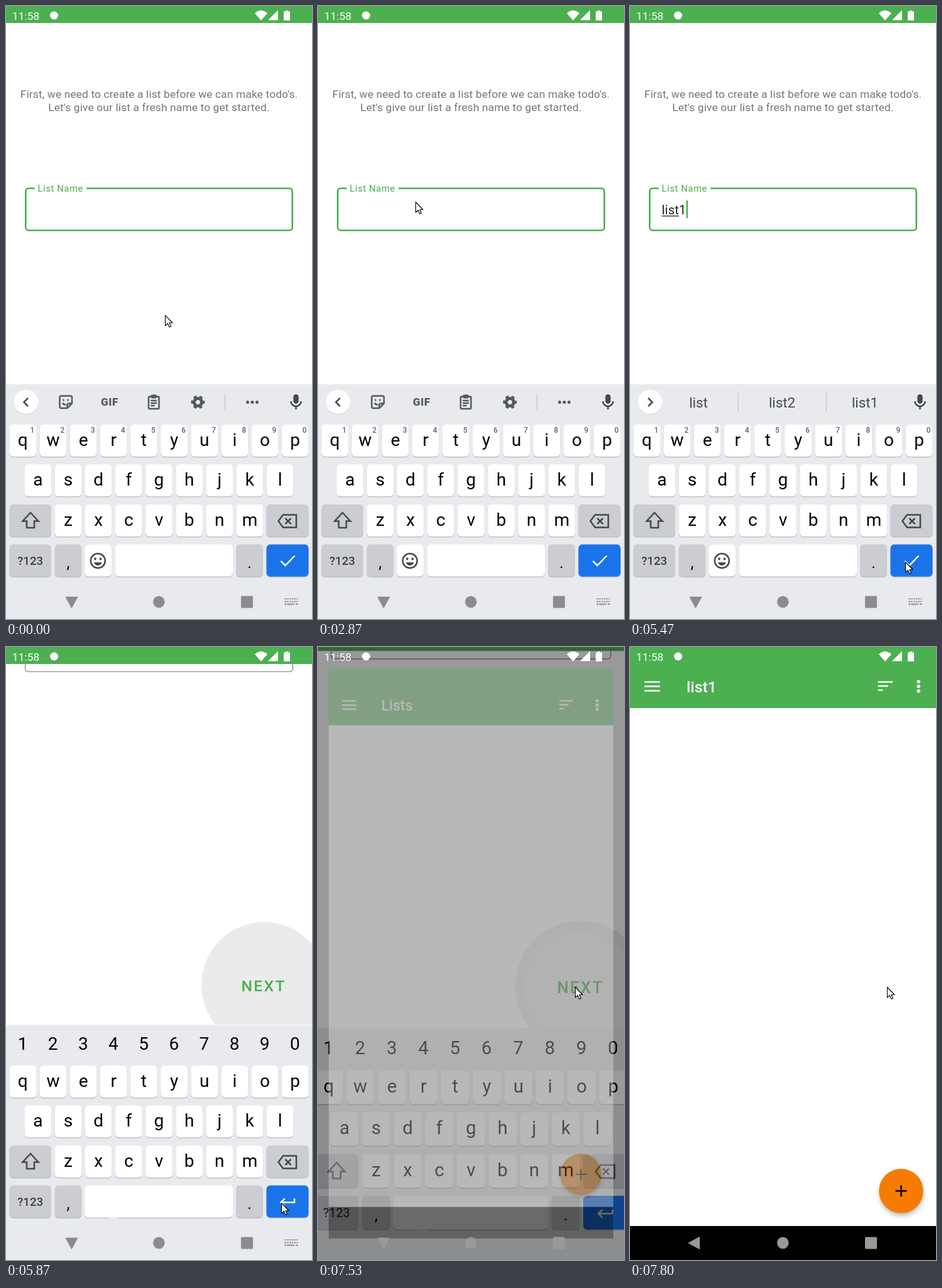
Write an HTML page that moves like this. It is 487x974 px and loops after 8000 ms.

```html
<!DOCTYPE html>
<html lang="en">
<head>
<meta charset="utf-8">
<title>New list</title>
<style>
  html, body { margin: 0; width: 100%; height: 100%; overflow: hidden; background: #000; }
  svg { display: block; width: 487px; height: 974px; font-family: Roboto, sans-serif; }
  .mid { text-anchor: middle; }
  .line { fill: none; stroke: #45484c; stroke-width: 2.5; }
  .white { stroke: #fff; }
  .medium { font-weight: 500; }
</style>
</head>
<body>
<svg viewBox="0 0 487 974" xmlns="http://www.w3.org/2000/svg">
  <defs>
    <clipPath id="view"><rect y="27" width="487" height="574"/></clipPath>
    <filter id="soft" x="-30%" y="-30%" width="160%" height="160%"><feGaussianBlur stdDeviation="4"/></filter>
  </defs>

  <g id="setup">
    <rect width="487" height="974" fill="#fff"/>
    <g clip-path="url(#view)">
      <g id="page">
        <g class="mid" font-size="17.36" letter-spacing=".13" fill="#757575">
          <text x="243.5" y="146">First, we need to create a list before we can make todo's.</text>
          <text x="243.5" y="167">Let's give our list a fresh name to get started.</text>
        </g>
        <rect id="outline" fill="none"/>
        <rect x="45.5" y="285" width="82.5" height="12" fill="#fff"/>
        <text id="label" x="50.5" y="295" font-size="14.9" letter-spacing=".55">List Name</text>
        <text id="input" x="50.5" y="331" font-size="19.84" letter-spacing=".3" fill="#212121"></text>
        <rect id="under" x="50.5" y="333" height="1.3" fill="#212121"/>
        <rect id="caret" y="309" width="2.5" height="28" fill="#4caf50"/>
        <circle id="focus" cx="411" cy="855" fill="#ebebeb"/>
        <circle id="press" cx="411" cy="857" fill="#fff" opacity=".18"/>
        <text class="medium" x="374.5" y="865" font-size="24.8" letter-spacing="2.2" fill="#4caf50">NEXT</text>
      </g>
    </g>
    <rect width="487" height="27" fill="#4caf50"/>

    <rect y="600" width="487" height="374" fill="#f4f5f6"/>
    <rect y="601.5" width="487" height="373" fill="#e8eaed"/>
    <g id="bar">
      <circle cx="32" cy="630" r="19.3" fill="#d2d4d7"/>
      <circle cx="32" cy="629" r="19.3" fill="#fff"/>
      <path id="chevron" class="line"/>
      <g fill="#45484c">
        <rect x="457.3" y="617" width="8.4" height="15" rx="4.2"/>
        <path class="line" d="M453.5 628a8 8 0 0 0 16 0M461.5 636v5"/>
      </g>
    </g>
    <g id="tools" fill="#55585c">
      <g class="line" stroke-width="2.3" style="stroke:#55585c">
        <path d="M88 619.5h14.500q2.500 0 2.500 2.500v9.500l-7.500 7.500h-9.500q-2.500 0-2.500-2.500v-14.500q0-2.500 2.500-2.500zM97.500 639v-5q0-2.500 2.500-2.500h5M90 630.500q1.500 3.500 5.500 3"/>
        <path d="M229 620.500h12.500q2 0 2 2v15.500q0 2-2 2h-12.500q-2 0-2-2v-15.500q0-2 2-2zM230.500 627h9.500M230.500 631h9.500M230.500 635h6"/>
      </g>
      <circle cx="91.500" cy="626" r="1.500"/><circle cx="98.500" cy="626" r="1.500"/>
      <rect x="230.500" y="617.500" width="9.500" height="6" rx="2"/>
      <text class="mid" x="165" y="635" font-size="17" font-weight="900" letter-spacing=".6">GIF</text>
      <circle cx="305.500" cy="629.500" r="6" fill="none" stroke="#55585c" stroke-width="5"/>
      <circle cx="305.500" cy="629.500" r="9.300" fill="none" stroke="#55585c" stroke-width="3.200" stroke-dasharray="5 4.740" stroke-dashoffset="2.500"/>
      <circle cx="384.500" cy="629.500" r="2.500"/><circle cx="392" cy="629.500" r="2.500"/><circle cx="399.500" cy="629.500" r="2.500"/>
      <path d="M348.500 616v27" stroke="#c4c7ca" stroke-width="1.300"/>
    </g>
    <g id="suggest" class="mid" font-size="22.3" fill="#45484c">
      <path d="M172 614v30M312.500 614v30" stroke="#c4c7ca" stroke-width="1.300"/>
      <text x="109" y="638"></text><text x="242" y="638"></text><text x="374" y="638"></text>
    </g>
    <g id="digits" class="mid" font-size="28"></g>
    <g id="keys" class="mid" font-size="28"></g>
    <g id="hints" class="mid medium" font-size="12" fill="#5f6368"></g>

    <path class="line" d="M39 805l12.500 13.500h-6.500v10.500h-12v-10.500h-6.500z"/>
    <path class="line" d="M441 808.500h21v20h-21l-7.500-10zM444.500 814l9 9M453.500 814l-9 9"/>
    <g id="smile">
      <circle class="line" cx="146.300" cy="881.500" r="11.500"/>
      <g fill="#45484c">
        <circle cx="142" cy="878.500" r="1.900"/><circle cx="150.600" cy="878.500" r="1.900"/>
        <path d="M139.800 884h13q-2 5-6.500 5t-6.500-5z"/>
      </g>
    </g>
    <path id="check" class="line white" d="M437.500 882l7 7 15-15.500"/>
    <path id="enter" class="line white" d="M459 876v6.500h-21M443.500 876.500l-6 6 6 6"/>
    <g id="mini" fill="none" stroke="#8c8c8f" stroke-width="2.200" stroke-dasharray="2.200 1.600">
      <path d="M443.500 942h21M443.500 946.300h21"/>
      <path d="M443.500 950.500h3.800M448 950.500h11M461 950.500h3.500" stroke-dasharray="none"/>
    </g>
  </g>

  <rect id="dim" width="487" height="974"/>

  <g id="lists">
    <rect width="487" height="974" fill="#fff"/>
    <rect width="487" height="97" fill="#4caf50"/>
    <rect y="920" width="487" height="54"/>
    <path class="line white" d="M23 55.500h24.500M23 62.500h24.500M23 69.500h24.500M394.500 55.500h23.500M394.500 62h16M394.500 68.500h8"/>
    <g fill="#fff">
      <circle cx="459.300" cy="55" r="2.800"/><circle cx="459.300" cy="62.500" r="2.800"/><circle cx="459.300" cy="70" r="2.800"/>
      <text id="title" class="medium" x="90" y="72" font-size="24.8"></text>
    </g>
    <circle cx="432" cy="869" r="34" opacity=".32" filter="url(#soft)"/>
    <circle cx="431.500" cy="864.300" r="35.300" fill="#f57c00"/>
    <path d="M422.500 864.300h18M431.500 855.300v18" stroke="#000" stroke-width="2.500"/>
  </g>

  <g fill="#fff">
    <text x="10" y="22" font-size="17.36">11:58</text>
    <circle cx="76.500" cy="15" r="6.500"/>
    <path d="M396 11.500q10-9 20 0l-10 11.500zM417 22.500h16v-16zM442 9.500q0-1 1-1h2v-1.500h4v1.500h2q1 0 1 1v12.500q0 1-1 1h-8q-1 0-1-1z"/>
  </g>
  <g id="nav">
    <path id="back" d="M93 947l17.500-9.500v19z" stroke-width="1" stroke-linejoin="round"/>
    <circle cx="243.300" cy="946.800" r="9.300"/>
    <rect x="374" y="937.500" width="19" height="19" rx="1.500"/>
  </g>
  <path id="mouse" d="M.5.500v16.500l3.800-3.600 2.700 5.800 2.500-1.200-2.600-5.500h5.100z" fill="#fff" stroke="#000" stroke-width="1.100" stroke-linejoin="round"/>
</svg>

<script>
const LOOP = 8000, STEP = 1000 / 15, SCROLL = 318;
const GREEN = '#4caf50', GRAY = '#cbcdd2';
const el = {};
document.querySelectorAll('svg [id]').forEach(n => el[n.id] = n);

const set = (id, attrs) => {
  for (const a in attrs) el[id].setAttribute(a, attrs[a]);
};
const show = (id, on) => { el[id].style.display = on ? '' : 'none'; };
const ramp = (k, from, to) => Math.min(1, Math.max(0, (k - from) / (to - from)));
const ease = p => p * p * (3 - 2 * p);
const mix = (a, b, p) => a + (b - a) * p;

// Keyboard
const PITCH = 48.15;
const keyX = i => 5.5 + PITCH * i;
const key = (x, y, w, fill = '#fff', id = '') =>
  `<rect x="${x}" y="${y + 1.3}" width="${w}" height="51" rx="6" fill="#b4b7bb"/>` +
  `<rect ${id && `id="${id}"`} x="${x}" y="${y}" width="${w}" height="51" rx="6" fill="${fill}"/>`;
const text = (s, x, y, size = 28) => `<text x="${x}" y="${y}" font-size="${size}">${s}</text>`;
const row = (letters, start, y) => [...letters].map((c, i) =>
  key(keyX(start + i), y, 42.6) + text(c, keyX(start + i) + 21.3, y + 33.5)).join('');

el.keys.innerHTML =
  row('qwertyuiop', 0, 665) + row('asdfghjkl', .5, 728.3) + row('zxcvbnm', 1.5, 792) +
  key(5.5, 792, 66.5, GRAY) + key(414.5, 792, 67, GRAY) +
  key(5.5, 855.5, 66.5, GRAY) + key(77.7, 855.5, 42.6, GRAY) +
  key(125.5, 855.5, 42.6) + key(173.5, 855.5, 187.5, '#fff', 'space') +
  key(366.2, 855.5, 42.6, GRAY) + key(414.5, 855.5, 67, '#1a73e8', 'done') +
  `<g fill="#3c4043" class="medium">${text('?123', 38.7, 888, 18.7)}</g>` +
  text(',', 99, 893, 25) + text('.', 387.5, 893, 25);
el.space = document.getElementById('space');
el.done = document.getElementById('done');

[...'1234567890'].forEach((d, i) => {
  el.digits.innerHTML += text(d, keyX(i) + 21, 640);
  el.hints.innerHTML += text(d, keyX(i) + 36.3, 678, 12);
});

// Typing: step, text, caret x, underline end, suggestions
const typing = [
  [0, '', 50.5, 50.5],
  [52, 'l', 55.6, 50.5],
  [55, 'li', 60.4, 55.6],
  [56, 'li', 60.4, 60.7, 'li list listen'],
  [59, 'lis', 71, 60.7, 'li list listen'],
  [60, 'lis', 71, 60.7, 'lis list list1'],
  [63, 'list', 77.8, 71, 'lis list2 list1'],
  [66, 'list', 77.8, 78, 'list list2 list1'],
  [69, 'list1', 89.5, 78, 'list list2 list1']
];

// Pointer moves: first step, last step, target
const moves = [[33, 39, 155, 311], [71, 82, 438, 883], [89, 97, 409, 540]];

const caretOn = k => k < 51 ? (k >= 5 && (k - 5) % 15 < 8) : k < 84;

function drawField(k) {
  const [, str, caretX, end, words] = typing.filter(s => s[0] <= k).pop();
  const blurred = k >= 84, w = blurred ? 1.4 : 2.6;
  el.input.textContent = str;
  set('outline', {
    x: 30 + w / 2, y: 288.4 + w / 2, width: 427 - w, height: 69.4 - w, rx: 4.5,
    stroke: blurred ? '#8c8c8c' : GREEN, 'stroke-width': w
  });
  set('label', { fill: blurred ? '#757575' : GREEN });
  set('under', { width: blurred ? 0 : end - 50.5 });
  set('caret', { x: caretX });
  show('caret', caretOn(k));

  const numeric = k >= 85;
  show('bar', !numeric);
  show('tools', !words);
  show('suggest', words && !numeric);
  show('digits', numeric);
  show('hints', !numeric);
  show('smile', !numeric);
  show('check', !numeric);
  show('enter', numeric);
  set('chevron', { d: words ? 'M29 623l6.500 6.500-6.500 6.500' : 'M35 623l-6.500 6.500 6.500 6.500' });
  set('space', numeric ? { x: 125.5, width: 235.5 } : { x: 173.5, width: 187.5 });
  set('done', { fill: k === 83 || k === 84 ? '#4b90ee' : '#1a73e8' });
  if (words) {
    const slots = el.suggest.querySelectorAll('text');
    words.split(' ').forEach((s, i) => { slots[i].textContent = s; });
  }
}

function drawPage(k) {
  const p = ramp(k, 84, 88);
  set('page', { transform: `translate(0 ${-SCROLL * (1 - (1 - p) ** 2)})` });
  set('focus', { r: 100 * (1 - (1 - p) ** 2) });
  set('press', { r: k < 103 ? 0 : mix(15, 86, ramp(k, 103, 110)) });
}

const zoom = s => `translate(243.5 487) scale(${s}) translate(-243.5 -487)`;

function drawSwitch(k) {
  const opening = k >= 113 && k < 115, late = k === 114, open = k >= 115;
  set('setup', { transform: zoom(opening ? (late ? 1.077 : 1.045) : 1) });
  set('dim', { opacity: opening ? (late ? .75 : .4) : 0 });
  set('lists', {
    opacity: open ? 1 : late ? .74 : opening ? .3 : 0,
    transform: zoom(open ? 1 : late ? .975 : .93)
  });
  el.title.textContent = open ? 'list1' : 'Lists';
  show('mini', k < 113);
  const tint = k < 113 ? '#8c8c8f' : '#999';
  set('nav', { fill: tint, stroke: 'none' });
  const turn = k < 114 ? -90 : k === 114 ? -72 : k === 115 ? -45 : k === 116 ? -15 : 0;
  set('back', { transform: `rotate(${turn} 103.500 946)`, stroke: tint });
}

function drawMouse(k) {
  let x = 253, y = 491;
  for (const [a, b, tx, ty] of moves) {
    const p = ease(ramp(k, a, b));
    x = mix(x, tx, p);
    y = mix(y, ty, p);
  }
  set('mouse', { transform: `translate(${x} ${y})` });
}

let last = -1;
function tick() {
  const k = Math.floor((performance.now() % LOOP + 4) / STEP) % 120;
  if (k !== last) {
    last = k;
    drawField(k);
    drawPage(k);
    drawSwitch(k);
    drawMouse(k);
  }
  requestAnimationFrame(tick);
}
tick();
</script>
</body>
</html>
```
